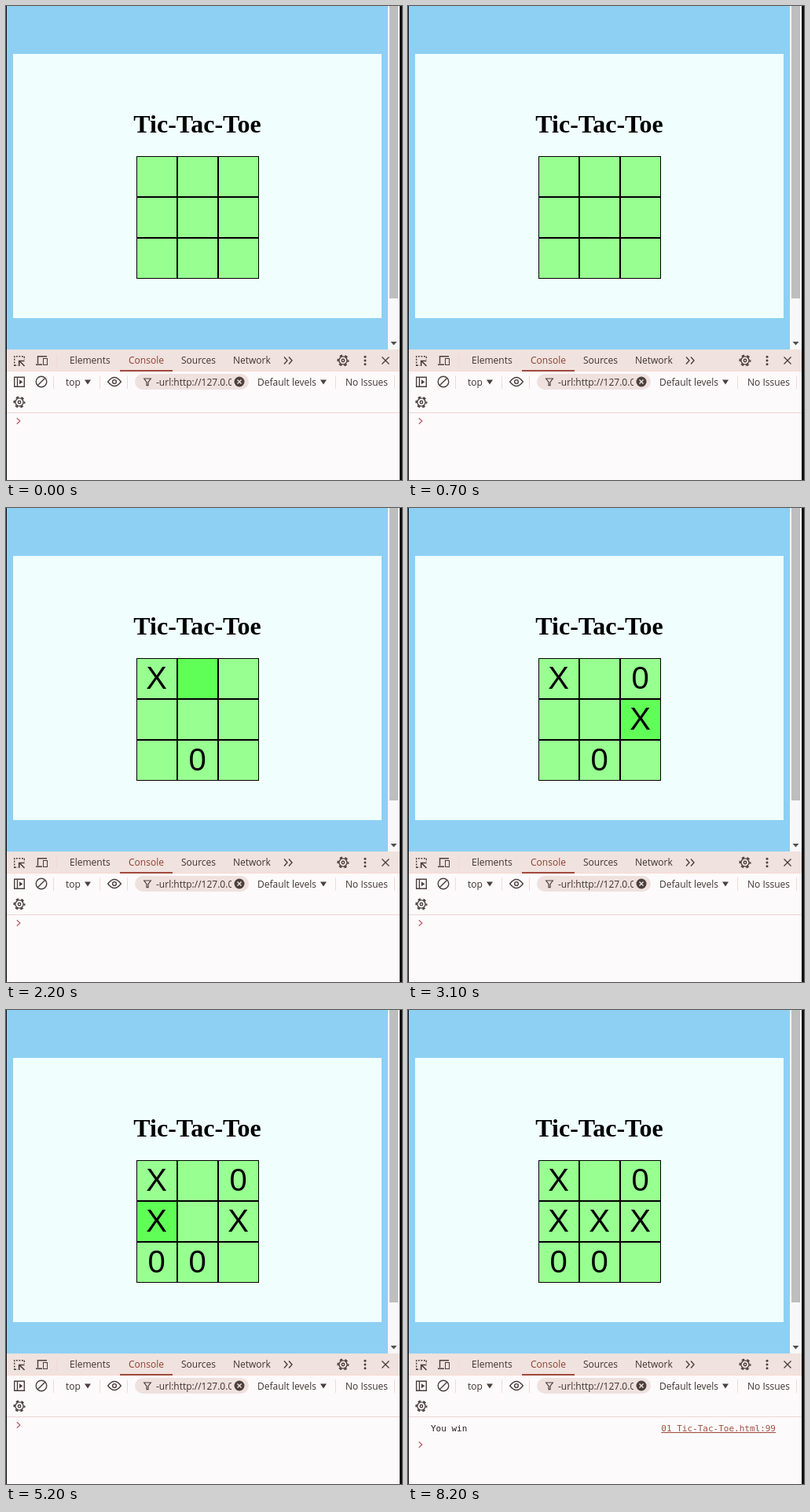
Animation of 504x603 px, one loop 9300 ms. Source, as an HTML page:

```html
<!DOCTYPE html>
<html lang="en">
<head>
<meta charset="utf-8">
<title>Tic-Tac-Toe</title>
<style>
  html, body { margin: 0; height: 100%; overflow: hidden; background: #0b0b0d; }
  svg { display: block; }
  rect { shape-rendering: crispEdges; }
  .ui { font: 12px "Open Sans", "Noto Sans", sans-serif; fill: #3e3331; }
  .icon { fill: none; stroke: #4b403e; stroke-width: 1.4; }
  .solid { fill: #4b403e; stroke: none; }
  .mark { font: 40px "Liberation Sans", Arial, sans-serif; text-anchor: middle; }
  .log { font: 11px "DejaVu Sans Mono", monospace; fill: #241b1a; }
</style>
</head>
<body>
<svg width="504" height="603" viewBox="0 0 504 603">
  <defs>
    <g id="gear">
      <circle r="5.1"/>
      <circle r="6.5" stroke-width="2" stroke-dasharray="3.4 3.407" stroke-dashoffset="1.7"/>
      <circle r="1.7"/>
    </g>
    <path id="drop" class="solid" d="M-4-3H4L0 3Z"/>
    <clipPath id="field"><rect x="188" y="468" width="99" height="20"/></clipPath>
  </defs>

  <!-- page -->
  <rect x="1" width="485" height="437" fill="#8ed0f3"/>
  <rect x="9" y="61" width="469" height="336" fill="#f0fffd"/>
  <text x="243.5" y="161" text-anchor="middle" font-family="'Liberation Serif', serif" font-size="32" font-weight="bold">Tic-Tac-Toe</text>
  <g id="board"></g>

  <!-- scrollbar -->
  <rect x="486" width="15" height="437" fill="#f8f8f8"/>
  <rect x="488" width="11" height="372" fill="#bebebe"/>
  <path d="M489.5 427h8l-4 4.5z" fill="#505050"/>

  <!-- developer tools -->
  <rect x="1" y="437" width="500" height="166" fill="#fdfafc"/>
  <rect x="1" y="437" width="500" height="27" fill="#f0e2de"/>
  <rect x="1" y="464" width="500" height="1" fill="#f8d9d2"/>
  <rect x="145" y="463" width="67" height="2" fill="#a04a3c"/>
  <rect x="1" y="517" width="500" height="1" fill="#edd6d1"/>
  <rect x="164" y="468" width="145" height="20" rx="10" fill="#efe1de" style="shape-rendering:auto"/>
  <path d="M64.5 443v16M60.5 470v17M119.5 470v17M154.5 470v17M419.5 470v17M494.5 470v17" stroke="#f2d9d3"/>

  <g class="ui">
    <text x="81" y="455">Elements</text>
    <text x="156" y="455" fill="#8f3f33">Console</text>
    <text x="223" y="455">Sources</text>
    <text x="289" y="455">Network</text>
    <text x="76" y="482.5">top</text>
    <text x="191" y="482.5" clip-path="url(#field)">-url:http://127.0.0.1</text>
    <text x="320" y="482.5">Default levels</text>
    <text x="432" y="482.5">No Issues</text>
  </g>

  <g class="icon">
    <path d="M10.7 458v-12.3H24" stroke-dasharray="2 1.6"/>
    <path d="M23.3 446v4M11 457.3h4" stroke-dasharray="2 1.6"/>
    <path d="M23.5 458l-6-6M16.7 458v-6.5h6.8" stroke-width="1.7"/>
    <path d="M52 445.7H40.5V455M38 456.3h8"/>
    <rect x="47.5" y="448.5" width="5" height="8"/>
    <path d="M354 446.5l4 4.5-4 4.5M360 446.5l4 4.5-4 4.5"/>
    <use href="#gear" x="429" y="451"/>
    <g class="solid"><circle cx="457" cy="446.3" r="1.5"/><circle cx="457" cy="451" r="1.5"/><circle cx="457" cy="455.7" r="1.5"/></g>
    <path d="M478.5 446.5l9 9m0-9l-9 9"/>
    <path d="M10.7 472.2h12.6v12H10.7zM14.5 472v12"/>
    <path d="M17 475.2l4.3 3-4.3 3z" class="solid"/>
    <circle cx="45" cy="478" r="6.8"/><path d="M40.2 482.8l9.6-9.6"/>
    <use href="#drop" x="104" y="478.5"/>
    <path d="M129.7 478q8.3-11 16.6 0-8.3 11-16.6 0z"/><circle cx="138" cy="478" r="2.4"/>
    <path d="M175.7 474h8.6l-3.3 4.4v4.3h-2v-4.3z" stroke-width="1.2"/>
    <circle cx="297" cy="478" r="6.5" class="solid"/>
    <path d="M294.5 475.5l5 5m0-5l-5 5" stroke="#f5e9e6"/>
    <use href="#drop" x="404" y="478.5"/>
    <use href="#gear" x="17" y="504"/>
  </g>

  <g id="log" class="log">
    <text x="29" y="536">You win</text>
    <text x="468" y="536" text-anchor="end" fill="#a0503f" text-decoration="underline">01 Tic-Tac-Toe.html:99</text>
  </g>
  <path id="prompt" d="M13.8 524.3l4 3.7-4 3.7" fill="none" stroke="#b9606c" stroke-width="1.3"/>
</svg>
<script>
const LOOP = 9300, WIN = 6200;
// [time, cell, mark]
const moves = [
  [1400, 0, "X"], [1700, 7, "0"], [2800, 5, "X"], [3100, 2, "0"],
  [4900, 3, "X"], [5200, 6, "0"], [WIN, 4, "X"]
];
// [time, cell under the pointer]
const hovers = [
  [0, -1], [800, 0], [2200, 1], [2400, 5], [4100, 4],
  [4500, 3], [5600, 4], [8100, 5], [8200, -1]
];
const byId = id => document.getElementById(id);

function add(tag, attrs) {
  const el = document.createElementNS("http://www.w3.org/2000/svg", tag);
  for (const key in attrs) el.setAttribute(key, attrs[key]);
  return byId("board").appendChild(el);
}

const cells = Array.from({ length: 9 }, (_, i) => {
  const x = 166 + i % 3 * 52, y = 191 + Math.floor(i / 3) * 52;
  add("rect", { x, y, width: 52, height: 52 });
  return {
    box: add("rect", { x: x + 1, y: y + 1, width: 50, height: 50 }),
    label: add("text", { x: x + 25.7, y: y + 39, class: "mark" })
  };
});

function draw(now) {
  const t = now % LOOP;
  const hovered = hovers.findLast(h => h[0] <= t)[1];
  cells.forEach(({ box, label }, i) => {
    box.setAttribute("fill", i === hovered ? "#60ff57" : "#98ff91");
    const move = moves.find(m => m[1] === i && m[0] <= t);
    label.textContent = move ? move[2] : "";
  });
  const won = t >= WIN;
  byId("log").setAttribute("visibility", won ? "visible" : "hidden");
  byId("prompt").setAttribute("transform", `translate(0 ${won ? 25 : 0})`);
}

const start = performance.now();
function tick() {
  draw(performance.now() - start);
  requestAnimationFrame(tick);
}
tick();
</script>
</body>
</html>
```
